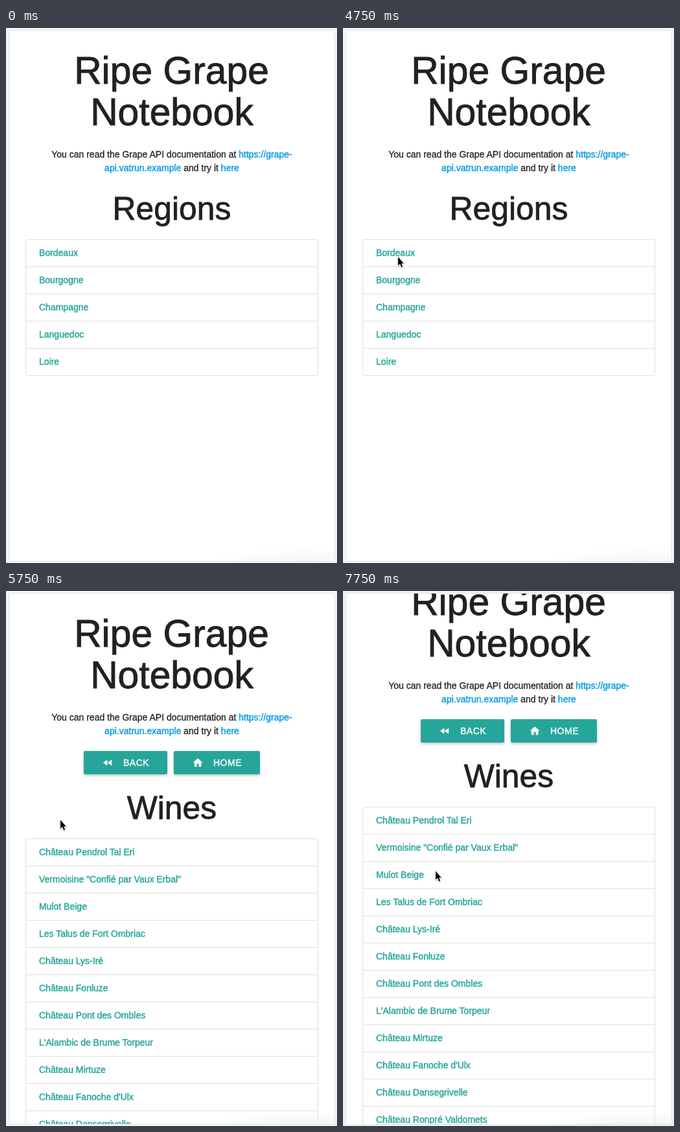
Animation of 511 by 826 pixels, one loop 8 s. Source, as an HTML page:

```html
<!DOCTYPE html>
<html lang="en">
<head>
<meta charset="utf-8">
<title>Ripe Grape Notebook</title>
<style>
  html, body { margin: 0; width: 100%; height: 100%; overflow: hidden; background: #f5f7f7; }
  svg { display: block; width: 100%; height: 100%; }
  text { font: 14px "Liberation Sans", Arial, sans-serif; fill: #212121; white-space: pre; }
  .mid { text-anchor: middle; }
  .h1 { font-size: 58.8px; stroke: #212121; stroke-width: .9px; }
  .h2 { font-size: 49.84px; stroke: #212121; stroke-width: .8px; }
  .small { stroke: #212121; stroke-width: .3px; }
  .link { fill: #039be5; stroke: #039be5; stroke-width: .4px; }
  .item { fill: #26a69a; stroke: #26a69a; stroke-width: .45px; }
  .line { fill: none; stroke: #e0e0e0; }
  .button rect { fill: #26a69a; filter: drop-shadow(0 2px 2px rgba(0, 0, 0, .24)); }
  .button path { fill: #fff; }
  .button text { fill: #fff; stroke: #fff; stroke-width: .45px; letter-spacing: .5px; }
</style>
</head>
<body>
<svg viewBox="0 0 511 826" preserveAspectRatio="none">
  <defs>
    <clipPath id="card"><rect x="5" y="4" width="502" height="819"/></clipPath>
    <radialGradient id="tint" cx=".75" cy="1" r=".8">
      <stop offset="0" stop-color="#e6f1f0" stop-opacity=".55"/>
      <stop offset="1" stop-color="#e6f1f0" stop-opacity="0"/>
    </radialGradient>
  </defs>
  <rect id="backdrop" width="511" height="826" fill="#f5f7f7"/>
  <rect x="4.5" y="3.5" width="503" height="820" fill="#fff" stroke="#dfe3e3"/>
  <g clip-path="url(#card)">
    <g id="page">
      <text class="mid h1" x="255.5" y="85.5">Ripe Grape</text>
      <text class="mid h1" x="256" y="149.5">Notebook</text>
      <text class="mid small" x="256" y="200">You can read the Grape API documentation at <tspan class="link">https://grape-</tspan></text>
      <text class="mid small" x="256" y="221"><tspan class="link">api.vatrun.example</tspan> and try it <tspan class="link">here</tspan></text>
      <g id="regions"></g>
      <g id="buttons"></g>
      <g id="loader" fill="#111">
        <rect x="251" y="298" width="2" height="2" opacity=".75"/>
        <rect x="254.5" y="297" width="3" height="3"/>
        <rect x="259" y="298" width="2" height="2" opacity=".75"/>
      </g>
      <g id="wines"></g>
    </g>
    <rect x="325" y="797" width="182" height="26" fill="url(#tint)"/>
  </g>
  <g id="pointer">
    <path d="M0 .5V13.7L3 11.1 5.2 16.2 7.2 15.4 5.1 10.5H8.8Z" stroke="#fff" stroke-width="1.6"
      stroke-linejoin="round" paint-order="stroke" style="filter:drop-shadow(0 1px 1px rgba(0,0,0,.3))"/>
  </g>
</svg>
<script>
const LOOP = 8000;
const ROW = 42;
const $ = id => document.getElementById(id);

const regions = ["Bordeaux", "Bourgogne", "Champagne", "Languedoc", "Loire"];
const wines = [
  "Château Pendrol Tal Eri",
  'Vermoisine "Confié par Vaux Erbal"',
  "Mulot Beige",
  "Les Talus de Fort Ombriac",
  "Château Lys-Iré",
  "Château Fonluze",
  "Château Pont des Ombles",
  "L'Alambic de Brume Torpeur",
  "Château Mirtuze",
  "Château Fanoche d'Ulx",
  "Château Dansegrivelle",
  "Château Ronpré Valdomets"
];

function list(title, names, top) {
  const rows = names.map((name, i) => {
    const y = top + i * ROW;
    const rule = i ? `<path class="line" d="M31 ${y + .5}H481"/>` : "";
    return `${rule}<text class="item" x="51" y="${y + 26}">${name}</text>`;
  });
  return `<text class="mid h2" x="256" y="${top - 30.5}">${title}</text>
    <rect class="line" x="30.5" y="${top + .5}" width="451" height="${names.length * ROW}" rx="2"/>
    ${rows.join("")}`;
}

function button(x, width, label, icon) {
  return `<g class="button"><rect x="${x}" y="247" width="${width}" height="36" rx="2"/>
    <path transform="translate(${x + 28} 256) scale(.758)" d="${icon}"/>
    <text x="${x + 61}" y="270">${label}</text></g>`;
}

$("regions").innerHTML = list("Regions", regions, 326);
$("wines").innerHTML = list("Wines", wines, 382);
$("buttons").innerHTML =
  button(120, 129, "BACK", "M11 18V6l-8.5 6zM11.5 12l8.5 6V6z") +
  button(259, 133, "HOME", "M10 20v-6h4v6h5v-8h3L12 3 2 12h3v8z");

// [start ms, pointer tip x, y]
const moves = [
  [1250, 343, 385], [1750, 301, 379], [2000, 297, 366], [2250, 184, 344],
  [2500, 105, 348], [2750, 87, 347], [4750, 85, 353], [5000, 84, 353],
  [6500, 135, 453], [6750, 143, 487], [7250, 143, 440], [7500, 143, 432]
];

const show = (id, on) => { $(id).style.display = on ? "" : "none"; };

function draw(t) {
  const move = moves.filter(m => m[0] <= t).pop();
  show("pointer", move);
  if (move) $("pointer").setAttribute("transform", `translate(${move[1]} ${move[2]})`);
  show("regions", t < 5500);
  show("buttons", t >= 5500);
  show("loader", t >= 5500 && t < 5750);
  show("wines", t >= 5750);
  $("page").setAttribute("transform", `translate(0 ${t >= 7750 ? -49 : 0})`);
  $("backdrop").setAttribute("fill", t >= 7500 ? "#edf3f2" : "#f5f7f7");
}

const start = performance.now();
function tick() {
  draw((performance.now() - start) % LOOP);
  requestAnimationFrame(tick);
}
tick();
</script>
</body>
</html>
```
